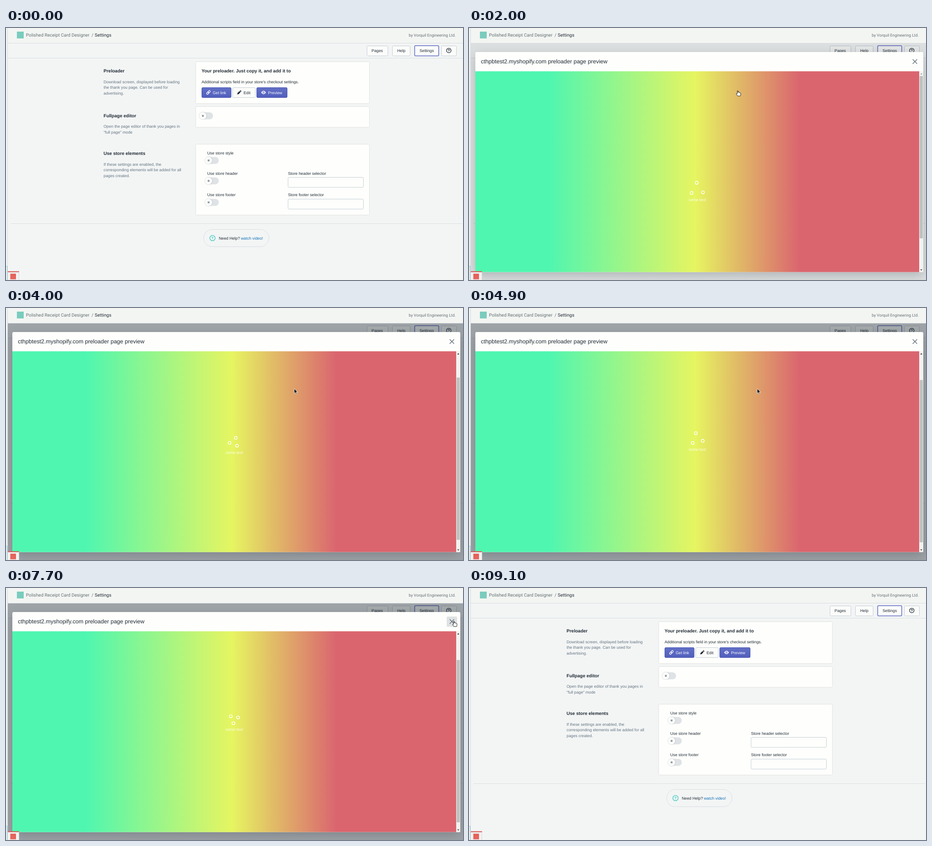
An HTML page that plays this animation: 1007 by 556 pixels, repeating every 9.7 s.

```html
<!DOCTYPE html>
<html lang="en">
<head>
<meta charset="utf-8">
<title>Settings</title>
<style>
  html, body { margin: 0; width: 100%; height: 100%; overflow: hidden; background: #f3f5f5; }
  svg { display: block; }
  text { font: 8.78px "Liberation Sans", Arial, sans-serif; fill: #212b36; text-rendering: geometricPrecision; white-space: pre; }
  .bar { font-family: Roboto, sans-serif; fill: #637074; }
  .crumb { font-size: 10.04px; }
  .dark { fill: #212b36; }
  .heading { font-size: 10.04px; font-weight: 700; }
  .muted text { fill: #637381; }
  .light { fill: #fff; }
  .title { font-size: 12.55px; }
  .mid { text-anchor: middle; }
  .end { text-anchor: end; }
  .line { stroke: #d9dee2; fill: none; }
  .card { fill: #fefffc; filter: drop-shadow(0 .6px 1px rgba(63, 63, 68, .22)); }
  .button { fill: #fbfcfa; stroke: #c4cdd5; }
  .primary { fill: url(#indigo); stroke: #4553b0; }
  .field { fill: #fefffc; stroke: #c4cdd5; }
  .knob { fill: #fefffc; filter: drop-shadow(0 .5px .8px rgba(60, 70, 80, .35)); }
  .panel { fill: #fefffc; filter: drop-shadow(0 8px 12px rgba(32, 42, 53, .25)); }
  .stroke { fill: none; stroke-linecap: round; stroke-linejoin: round; }
</style>
</head>
<body>
<svg width="1007" height="556" viewBox="0 0 1007 556">
  <defs>
    <linearGradient id="indigo" x2="0" y2="1">
      <stop stop-color="#6270c6"/><stop offset="1" stop-color="#525fbd"/>
    </linearGradient>
    <linearGradient id="rainbow">
      <stop offset=".165" stop-color="#4ff6b0"/>
      <stop offset=".495" stop-color="#e6f561"/>
      <stop offset=".73" stop-color="#da656f"/>
    </linearGradient>
    <g id="toggle">
      <rect id="track" x="-6.5" y="-7.8" width="29" height="15.6" rx="7.8" fill="#dfe3e6"/>
      <g id="knob">
        <circle class="knob" r="7.8"/>
        <path d="M-1.8-1.8 1.8 1.8M1.8-1.8-1.8 1.8" stroke="#8a959d" stroke-width="1.8"/>
      </g>
    </g>
    <path id="question" class="stroke" d="M-1.9-1.3C-1.8-3.6 1.9-3.4 1.8-1.2 1.7 0 0 0 0 1.3M0 3.1V3.2"/>
  </defs>

  <rect width="1007" height="556" fill="#f3f5f5"/>
  <rect x="4" width="1003" height="33" fill="#f3f5f2"/>

  <rect x="24" y="8" width="15" height="15" fill="#7accbd"/>
  <text class="bar crumb" x="44" y="19">Polished Receipt Card Designer</text>
  <text class="bar crumb" x="188.5" y="19">/</text>
  <text class="bar crumb dark" x="195.5" y="19">Settings</text>
  <text class="bar end" x="991" y="18.7">by Vorquil Engineering Ltd.</text>
  <path class="line" d="M4 33.5H1007M4 66.5H1007M10 431.5H1005"/>

  <rect class="button" x="795.5" y="39.5" width="46" height="22" rx="2"/>
  <rect class="button" x="851.5" y="39.5" width="39" height="22" rx="2"/>
  <rect class="button" x="900.5" y="39" width="53" height="22.5" rx="2" style="stroke:#5c6ac4;stroke-width:1.5"/>
  <rect class="button" x="959.5" y="39.5" width="33" height="22" rx="2"/>
  <g class="mid">
    <text x="818" y="53">Pages</text>
    <text x="871" y="53">Help</text>
    <text x="927" y="53">Settings</text>
  </g>
  <g transform="translate(975.7 49.6)" stroke="#212b36" stroke-width="1.3">
    <circle r="5" fill="none"/>
    <use href="#question" transform="scale(.85)"/>
  </g>

  <text class="heading" x="215" y="97.6">Preloader</text>
  <text class="heading" x="215" y="196.6">Fullpage editor</text>
  <text class="heading" x="215" y="280">Use store elements</text>
  <g class="muted">
    <text x="215" y="121.5">Download screen, displayed before loading</text>
    <text x="215" y="134">the thank you page. Can be used for</text>
    <text x="215" y="146.5">advertising.</text>
    <text x="215" y="220.4">Open the page editor of thank you pages in</text>
    <text x="215" y="233">"full page" mode</text>
    <text x="215" y="303.7">If these settings are enabled, the</text>
    <text x="215" y="316.2">corresponding elements will be added for all</text>
    <text x="215" y="328.8">pages created.</text>
  </g>

  <rect class="card" x="418.5" y="75" width="381.5" height="91" rx="1.5"/>
  <rect class="card" x="418.5" y="174" width="381.5" height="44.5" rx="1.5"/>
  <rect class="card" x="418.5" y="257" width="381.5" height="155" rx="1.5"/>

  <text class="heading" x="431" y="97.6">Your preloader. Just copy it, and add it to</text>
  <text x="431" y="121.5">Additional scripts field in your store's checkout settings.</text>
  <rect class="primary" x="431.5" y="131.5" width="64.5" height="22" rx="2"/>
  <rect class="button" x="499.5" y="131.5" width="50" height="22" rx="2"/>
  <rect class="primary" id="preview" x="552.5" y="131.5" width="67" height="22" rx="2"/>
  <g transform="translate(446 142.2) rotate(-45)" fill="none" stroke="#fff" stroke-width="1.3">
    <rect x="-5" y="-1.9" width="5.8" height="3.8" rx="1.9"/>
    <rect x="-.8" y="-1.9" width="5.8" height="3.8" rx="1.9"/>
  </g>
  <path d="M509.5 146.6l.6-3 4.3-4.3 2.4 2.4-4.3 4.3zM515 138.7l1-1q.6-.5 1.2 0l1.2 1.2q.5.6 0 1.2l-1 1z" fill="#212b36"/>
  <path d="M562.3 142.2q5.2-7.6 10.4 0q-5.2 7.6-10.4 0z" fill="#fff"/>
  <circle cx="567.5" cy="142.2" r="1.7" fill="#fff" stroke="#5a67c1" stroke-width="1.2"/>
  <text class="light" x="455.5" y="145.5">Get link</text>
  <text x="523.5" y="145.5">Edit</text>
  <text class="light" x="577.5" y="145.5">Preview</text>

  <text x="443.5" y="278.6">Use store style</text>
  <text x="443.5" y="324">Use store header</text>
  <text x="443.5" y="371.4">Use store footer</text>
  <text x="621.5" y="324">Store header selector</text>
  <text x="621.5" y="371.4">Store footer selector</text>
  <rect class="field" x="621.5" y="329.5" width="166" height="22" rx="2"/>
  <rect class="field" x="621.5" y="377.5" width="166" height="22" rx="2"/>
  <use href="#toggle" x="433.8" y="193.8"/>
  <use href="#toggle" x="446.4" y="292.2"/>
  <use href="#toggle" x="446.4" y="337.3"/>
  <use href="#toggle" x="446.4" y="384.7"/>

  <rect class="line" x="435.5" y="444.5" width="144" height="38" rx="19"/>
  <circle cx="455" cy="463.5" r="8.2" fill="#e3f3ef"/>
  <g transform="translate(455 463.5)" stroke="#47c1bf" stroke-width="1.3">
    <circle r="5.7" fill="#f6fbf9"/>
    <use href="#question" transform="scale(.85)"/>
  </g>
  <text x="469" y="466.7">Need Help?</text>
  <text x="517.5" y="466.7" style="fill:#1070b4">watch video!</text>

  <rect id="shade" x="4" y="34" width="1003" height="522" fill="#212b36"/>
  <g id="modal">
    <rect class="panel" x="14" y="53" width="987" height="485.5" rx="3"/>
    <text class="title" x="26.3" y="78.3">cthpbtest2.myshopify.com preloader page preview</text>
    <rect id="closeHover" x="971" y="63" width="23" height="22.5" rx="2" fill="#dfe2e3"/>
    <path class="stroke" d="M978 69.5l9 9M987 69.5l-9 9" stroke="#5f6b76" stroke-width="1.4"/>
    <rect x="14" y="95.5" width="978" height="443" fill="url(#rainbow)"/>
    <rect x="992" y="95.5" width="9" height="443" fill="#f1f2f0"/>
    <path id="upArrow" d="M994.3 102.5h4.6l-2.3-3z"/>
    <path d="M994.3 532.5h4.6l-2.3 3z" fill="#4a4d4c"/>
    <rect id="thumb" x="993" y="106" width="7" height="358" fill="#c0c1bf"/>
    <g id="loader">
      <g id="rings" fill="none" stroke="#fff" stroke-width="1.4">
        <circle r="3.2"/><circle r="3.2"/><circle r="3.2"/>
      </g>
      <text class="light mid" x="503" y="381.6" opacity=".85">some text</text>
    </g>
  </g>

  <path d="M3.5 0V556" stroke="#d3dadb"/>
  <path d="M0 525.5H2.5V556" fill="none" stroke="#8fc5c9"/>
  <rect x="4" y="537" width="25" height="19" fill="#f1f2f1"/>
  <rect x="4" y="536.7" width="25" height="2" fill="#d9534f"/>
  <path d="M28.5 538V556" stroke="#d5d9d9"/>
  <rect x="9.5" y="542" width="12.5" height="12.5" fill="#e5635c"/>

  <g id="cursor" stroke-linejoin="round">
    <path id="arrow" d="M0 0V10.4L2.4 8.3 4 12 5.8 11.2 4.2 7.6H7.5Z" fill="#111" stroke="#fff" stroke-width=".8"/>
    <path id="hand" d="M-.9.8Q0-.6.9.8V4.2Q2-.0+3.2 4.7Q4.4 4 5 5.2Q6.6 4.7 6.8 6.4V9L5.8 12H0L-3.2 7.6Q-3 5.8-.9 7.3Z" fill="#fff" stroke="#111" stroke-width=".9"/>
  </g>
</svg>
<script>
const LOOP = 9700, STEP = 100;
// Pointer path: time, x, y
const path = [
  [700, 232, 42], [800, 746, 242], [900, 742, 235], [1000, 742, 235],
  [1100, 700, 222], [1200, 640, 187], [1300, 609, 167], [1400, 609, 167],
  [1500, 598, 147], [1600, 592, 138], [2900, 592, 138], [3100, 613, 152],
  [3400, 635, 178], [5400, 635, 178], [5700, 641, 186], [6200, 641, 186],
  [6800, 991, 71], [6900, 987, 73], [8000, 987, 73], [8200, 970, 96],
  [8600, 420, 55], [8900, 33, 8], [9100, 33, 8]
];
const el = id => document.getElementById(id);
const rings = [...el('rings').children];
const clamp = v => Math.min(1, Math.max(0, v));
const smooth = v => v * v * (3 - 2 * v);
const within = (t, from, to) => t >= from && t < to;
const show = (id, on) => el(id).style.display = on ? '' : 'none';
const move = (node, x, y) => node.setAttribute('transform', `translate(${x} ${y})`);

function pointerAt(t) {
  const i = path.findIndex(p => p[0] > t);
  if (i < 1) return path[0].slice(1);
  const [t0, x0, y0] = path[i - 1], [t1, x1, y1] = path[i];
  const k = (t - t0) / (t1 - t0);
  return [x0 + (x1 - x0) * k, y0 + (y1 - y0) * k];
}

// Each half turn takes 750 ms; the rings pull together and spread again.
function spin(t) {
  const turns = (t - 1345) / 750, n = Math.floor(turns), u = turns - n;
  const radius = 15 - 6.1 * Math.sin(Math.PI * u ** .7) ** 2;
  const angle = 180 * (n + smooth(u ** .58)) - 30;
  rings.forEach((ring, i) => {
    const a = (angle + 120 * i) * Math.PI / 180;
    move(ring, 502.6 + radius * Math.cos(a), 356 + radius * Math.sin(a));
  });
}

function render(t) {
  const open = within(t, 2000, 7800), reloading = within(t, 1900, 2000);
  show('modal', open);
  show('shade', open);
  show('track', !reloading);
  move(el('knob'), reloading ? 3.5 : 0, reloading ? .6 : 0);
  el('preview').style.fill = within(t, 1500, 2000) ? '#525fba' : '';

  el('shade').setAttribute('opacity', .4 * clamp((t - 1950) / 200));
  const scroll = 67 * smooth(clamp((t - 3600) / 500));
  move(el('loader'), 0, -scroll);
  move(el('thumb'), 0, scroll * .79);
  el('upArrow').setAttribute('fill', scroll ? '#2f3231' : '#a0a3a2');
  show('closeHover', within(t, 6900, 7800));
  spin(t);

  const hand = within(t, 1500, 2100) || within(t, 6900, 7800);
  show('cursor', within(t, 700, 9100));
  show('hand', hand);
  show('arrow', !hand);
  move(el('cursor'), ...pointerAt(t));
}

const start = performance.now();
function tick() {
  const t = (performance.now() - start) % LOOP;
  render(Math.floor(t / STEP) * STEP);
  requestAnimationFrame(tick);
}
tick();
</script>
</body>
</html>
```
